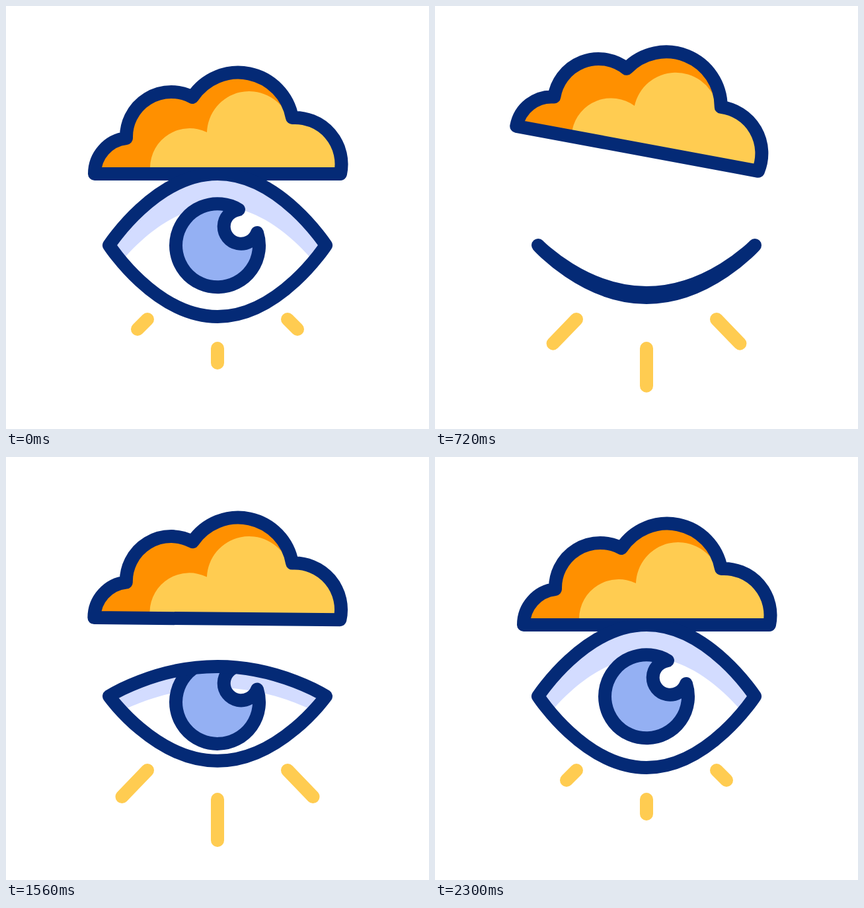
An HTML page for the animation above (2400 ms loop, 640x640 px).

```html
<!DOCTYPE html>
<html lang="en">
<head>
<meta charset="utf-8">
<title>Blinking eye and cloud</title>
<style>
  html, body { margin: 0; width: 100%; height: 100%; overflow: hidden; background: #fff; }
  svg { display: block; width: 100%; height: 100%; }
  .line { fill: none; stroke: #042a76; stroke-width: 20; stroke-linecap: round; stroke-linejoin: round; }
  .ray { fill: none; stroke: #ffcc51; stroke-width: 20; stroke-linecap: round; }
</style>
</head>
<body>
<svg viewBox="0 0 640 640">
  <defs>
    <clipPath id="inside"><path id="clipShape"/></clipPath>
    <path id="puff"
      d="M134 254A54 54 0 0 1 182 200A68 68 0 0 1 282 138A83 83 0 0 1 433 169A70.5 70.5 0 0 1 506 254Z"/>
  </defs>
  <g id="cloud">
    <use href="#puff" fill="#ff9000"/>
    <path fill="#ffcc51"
      d="M218 254V244A60 60 0 0 1 304 191A64 64 0 0 1 425 164L433 169A70.5 70.5 0 0 1 506 254Z"/>
    <use href="#puff" class="line"/>
  </g>
  <path id="white" fill="#fff"/>
  <g clip-path="url(#inside)">
    <path id="shade" fill="#d3dcff"/>
    <path id="iris" class="line" style="fill:#94b0f3"
      d="M352 308A63 63 0 1 0 380 343A26 26 0 1 1 352 308Z"/>
  </g>
  <path id="lids" class="line"/>
  <path id="rays" class="ray"/>
</svg>
<script>
const LOOP = 2400, STEP = 20, LAST = 2300;
const el = id => document.getElementById(id);

// Cubic ease with handles at (2/3, 0) and (1/3, 1)
function ease(x) {
  let lo = 0, hi = 1;
  for (let i = 0; i < 24; i++) {
    const s = (lo + hi) / 2, r = 1 - s;
    if (2 * r * r * s + r * s * s + s * s * s < x) lo = s; else hi = s;
  }
  return lo * lo * (3 - 2 * lo);
}

// Keys are [time, value] pairs
function track(keys, t) {
  for (let i = 1; i < keys.length; i++) {
    const [t0, a] = keys[i - 1], [t1, b] = keys[i];
    if (t <= t1) return a + (b - a) * ease((t - t0) / (t1 - t0));
  }
  return keys[keys.length - 1][1];
}

const CLOSE = [[0, 0], [880, 1], [2100, 0]];
const GAZE = [[0, 0], [600, 60], [880, 60], [1900, 0]];
const GLOW = [[0, 0], [1200, 1], [2320, 0]];
const TILT = [[0, 0], [410, -15.3], [860, 14], [1320, -8.2], [1735, 4], [2100, 0]];
const HOP = [[0, 0], [450, 31.5], [690, -38], [920, 36], [1150, -22],
             [1370, 14.5], [1520, -10], [1760, 15], [2160, 0]];

// Arc between the eye corners with its middle at height y, shifted down by d
function arc(from, y, d = 0) {
  const to = 640 - from, bend = from < to ? 70 : -70;
  return `${from} ${362 + d}S${from + bend} ${y + d} 320 ${y + d}S${to} ${362 + d} ${to} ${362 + d}`;
}

function draw(t) {
  const p = track(CLOSE, t), top = 254 + 186 * p, low = 470 - 30 * p;
  const eye = `M${arc(156, top)}L${arc(484, low)}Z`;
  for (const id of ["white", "clipShape", "lids"]) el(id).setAttribute("d", eye);
  el("shade").setAttribute("d", `M${arc(156, top)}L${arc(484, top, 49 * (1 - p))}Z`);
  el("iris").setAttribute("transform", `translate(0 ${track(GAZE, t)})`);

  el("cloud").setAttribute("transform",
    `translate(0 ${track(HOP, t)}) rotate(${track(TILT, t)} 320 178)`);

  const q = track(GLOW, t), dx = 15 + 27 * q, dy = 15 + 28.7 * q;
  el("rays").setAttribute("d",
    `M214 474l${-dx} ${dy}M426 474l${dx} ${dy}M320 518v${22 + 46 * q}`);
}

const start = performance.now();
function tick() {
  const t = (performance.now() - start) % LOOP;
  draw(Math.min(Math.floor(t / STEP) * STEP, LAST));
  requestAnimationFrame(tick);
}
draw(0);
requestAnimationFrame(tick);
</script>
</body>
</html>
```
